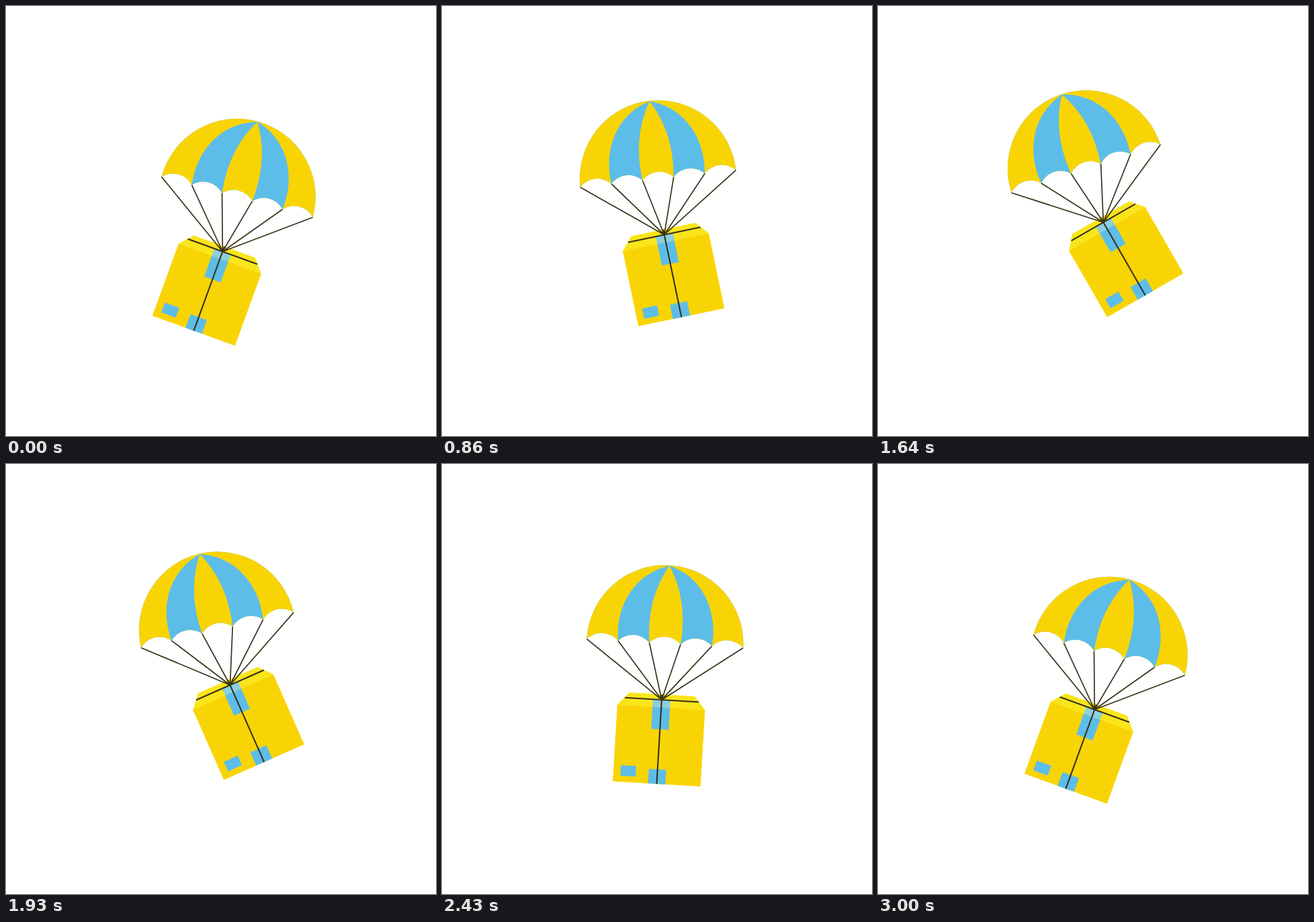
These frames come from a looping animation (640x640 px, 3.07 s). An HTML page:

```html
<!DOCTYPE html>
<html lang="en">
<head>
<meta charset="utf-8">
<title>Parachute parcel</title>
<style>
  html, body { margin: 0; height: 100%; overflow: hidden; background: #fff; }
  svg { display: block; width: 100vw; height: 100vh; }
  .yellow { fill: #f9d405; }
  .flap { fill: #f9e51a; }
  .blue { fill: #5dbde9; }
  .pale { fill: #8bcfe0; }
  .rope { fill: none; stroke: #38331a; stroke-width: 1.7; }
  .strap { fill: none; stroke: #38301a; stroke-width: 2.1; }
</style>
</head>
<body>
<svg viewBox="0 0 640 640">
  <!-- origin: the knot -->
  <g id="box">
    <path class="yellow" d="M-65.5 11H65.3V125.4H-65.5Z"/>
    <path class="flap" d="M-48.6-8H48.6L65.3 11.4H-65.5Z"/>
    <path class="pale" d="M-13 0H13V11.4H-13Z"/>
    <path class="blue" id="topTape"/>
    <path class="blue" id="lowTape"/>
    <path class="blue" d="M-54.7 100.7h22.6v15.6h-22.6Z"/>
    <path class="strap" d="M-55 0H55M0-8V125.4"/>
  </g>
  <!-- origin: the swing pivot, above the knot -->
  <g id="chute">
    <path class="rope" id="ropes"/>
    <path class="blue" id="rim"/>
    <path class="yellow" id="dome"/>
    <path class="blue" id="stripe"/>
    <path class="blue" id="mirror" transform="scale(-1 1)"/>
  </g>
</svg>
<script>
const $ = id => document.getElementById(id);
const draw = (id, d) => $(id).setAttribute('d', d);

const R = 116.6, GAP = R * 2 / 5, HEM = -61, KNOT = 23;
const scallop = `a32 32 0 0 0 ${-GAP} 0`;
const dome = `M${-R} ${HEM}A${R} ${R} 0 0 1 ${R} ${HEM}${scallop.repeat(5)}Z`;
const stripe = `M${-1.5 * GAP} ${HEM}C-76-108-55-161 0-177C-21-142-28-105 ${-GAP / 2} ${HEM}${scallop}Z`;
draw('rim', dome);
draw('dome', dome);
draw('stripe', stripe);
draw('mirror', stripe);
draw('ropes', Array.from({ length: 6 }, (_, i) => `M${i * GAP - R} ${HEM}L0 ${KNOT}`).join(''));

const teeth = 'l1.625-2.5 1.625 2.5'.repeat(8);
draw('topTape', `M-13 11.4V45.4${teeth}V11.4Z`);
draw('lowTape', `M-13 125.4V105${teeth}V125.4Z`);

const LOOP = 3070, STEPS = 43, TURN = 22, LAST = STEPS - 1;

// sharp: 0 is a cubic ease, 1 a quintic one; push: extra speed at the start
function ease(u, sharp, push = 0) {
  const cubic = u * u * (3 - 2 * u);
  const quintic = u ** 3 * (10 - 15 * u + 6 * u * u);
  return cubic + sharp * (quintic - cubic) + push * u * (1 - u) ** 2;
}

// Swings from a to b, then back to a
function sway(n, a, b, sharp, push) {
  const p = n < TURN
    ? ease(n / TURN, sharp, push)
    : 1 - ease((n - TURN) / (LAST - TURN), sharp);
  return a + (b - a) * p;
}

function frame() {
  // Steps start on whole hundredths of a second
  const t = Math.floor(performance.now() % LOOP / 10) * 10 + 5;
  const n = Math.min(LAST, Math.floor(t * STEPS / LOOP));
  const y = sway(n, 343.3, 299.8, 0, .2);
  const swing = sway(n, 15, -18.2, 0, .65);
  const tilt = sway(n, 20, -30.1, .6, .5);
  const pose = `translate(328.3 ${y}) rotate(${swing})`;
  $('chute').setAttribute('transform', pose);
  $('box').setAttribute('transform', `${pose} translate(0 ${KNOT}) rotate(${tilt - swing})`);
  requestAnimationFrame(frame);
}
frame();
</script>
</body>
</html>
```
